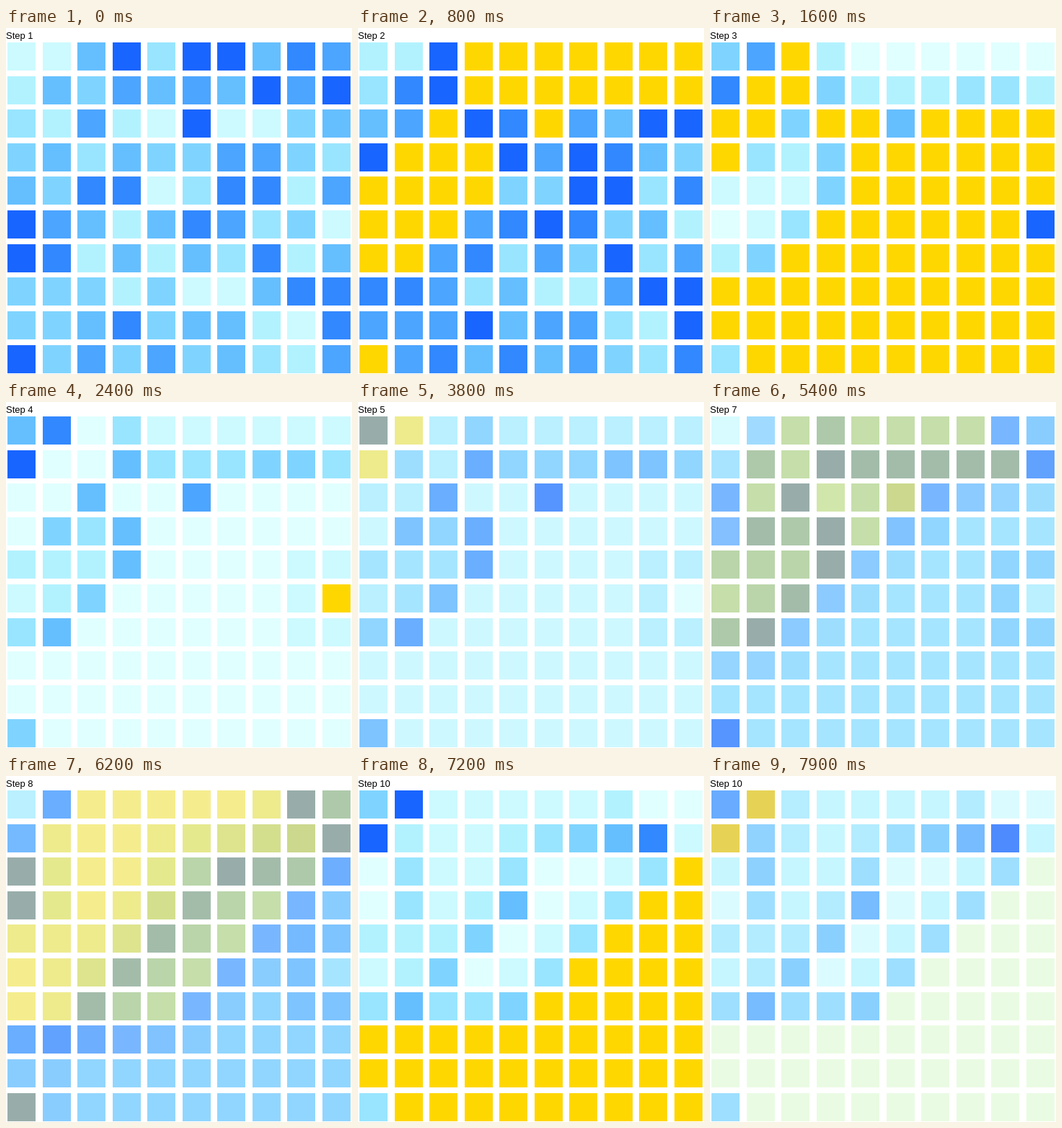
An HTML page with a canvas that plays this animation: 480 by 480 pixels, repeating every 8 s.

```html
<!DOCTYPE html>
<html lang="en">
<head>
<meta charset="utf-8">
<title>Energy grid</title>
<style>
  html, body { margin: 0; width: 480px; height: 480px; overflow: hidden; background: #fff; }
  canvas { display: block; }
  #label {
    position: absolute; left: 0; top: 3px;
    font: 13px/15px "Liberation Sans", Arial, sans-serif;
    color: #000; white-space: pre;
  }
</style>
</head>
<body>
<canvas id="grid" width="480" height="480"></canvas>
<div id="label">Step 1</div>
<script>
const SIZE = 10, STEPS = 10, TICK = 100, TICKS_PER_STEP = 8, HOLD_TICKS = 6;
const COLORS = ["#ffd700", "#e0ffff", "#ccfaff", "#b2f2ff", "#99e5ff",
  "#7fd4ff", "#65bfff", "#4ca5ff", "#3288ff", "#1965ff"];
const START = `
  2269499687
  3657676979
  4373292256
  5646557754
  6588248837
  9763687452
  9836364836
  5553522688
  5568566328
  9575756437`;

// Every cell gains 1; a cell passing 9 flashes, feeds its neighbours and resets to 0.
function advance(cells) {
  const next = cells.map(v => v + 1);
  const flashed = new Set();
  const queue = [...next.keys()].filter(i => next[i] > 9);
  while (queue.length) {
    const i = queue.pop();
    if (flashed.has(i)) continue;
    flashed.add(i);
    const col = i % SIZE, row = (i - col) / SIZE;
    for (let y = Math.max(0, row - 1); y <= Math.min(SIZE - 1, row + 1); y++)
      for (let x = Math.max(0, col - 1); x <= Math.min(SIZE - 1, col + 1); x++) {
        const n = y * SIZE + x;
        if (n !== i && ++next[n] > 9) queue.push(n);
      }
  }
  return next.map((v, i) => flashed.has(i) ? 0 : v);
}

const states = [[...START.replace(/\s/g, "")].map(Number)];
while (states.length <= STEPS) states.push(advance(states.at(-1)));

const ctx = document.getElementById("grid").getContext("2d");
const label = document.getElementById("label");

function drawCells(cells, alpha) {
  ctx.globalAlpha = alpha;
  cells.forEach((v, i) => {
    ctx.fillStyle = COLORS[v];
    ctx.fillRect(Math.round(2 + 48.5 * (i % SIZE)),
      Math.round(20 + 46.62 * Math.floor(i / SIZE)), 39, 39);
  });
}

function render(now) {
  const tick = Math.floor(now / TICK) % (STEPS * TICKS_PER_STEP);
  const step = Math.floor(tick / TICKS_PER_STEP);
  const fade = Math.max(0, tick % TICKS_PER_STEP - HOLD_TICKS + 1) / 3;
  ctx.clearRect(0, 0, 480, 480);
  drawCells(states[step], 1 - fade);
  if (fade) drawCells(states[step + 1], fade);
  label.textContent = `Step ${step + 1}`;
  requestAnimationFrame(render);
}
requestAnimationFrame(render);
</script>
</body>
</html>
```
